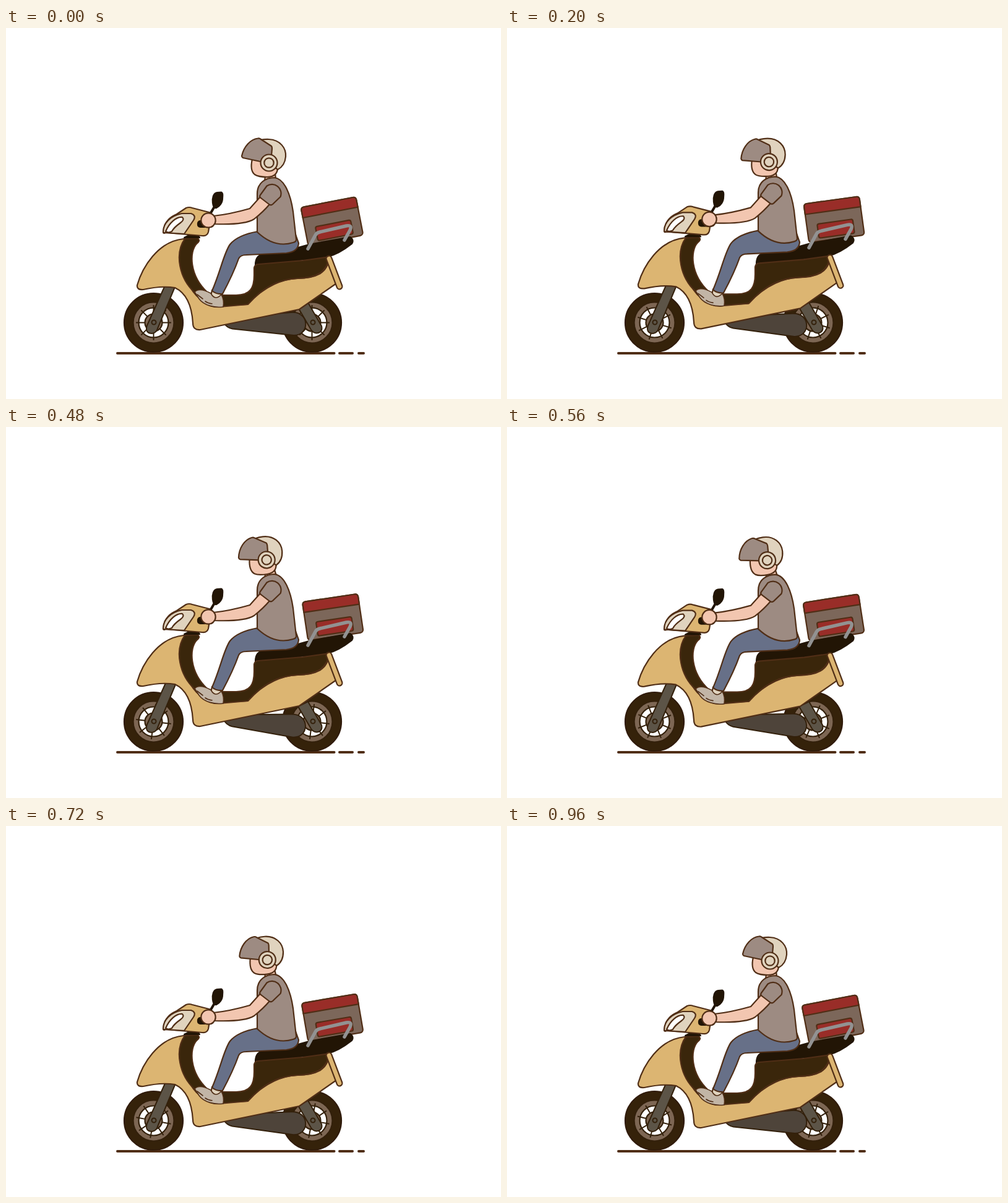
An HTML page that plays this animation: 800 px wide and 600 px high, repeating every 1000 ms.

```html
<!DOCTYPE html>
<html lang="en">
<head>
<meta charset="utf-8">
<title>Scooter courier</title>
<style>
  html, body { margin: 0; width: 100%; height: 100%; overflow: hidden; background: #fff; }
  svg { display: block; width: 100%; height: 100%; }
  .line { fill: none; stroke-linecap: round; stroke-linejoin: round; }
  .tan { fill: #dcb572; }
  .dark { fill: #3a260b; }
  .black { fill: #221505; }
  .cream { fill: #e0d3be; }
  .grey { fill: #9d8b82; }
  .skin { fill: #f2c6b0; }
  .jeans { fill: #677088; }
  .metal { fill: #5c5447; }
  .red { fill: #992d28; }
</style>
</head>
<body>
<svg viewBox="0 0 800 600" stroke="#502e16" stroke-width="2.200" stroke-linejoin="round">
  <defs>
    <g id="rim" stroke="#33200b">
      <circle r="47.500" fill="#35220a" stroke="#301b0b"/>
      <circle r="33" fill="#7d6653"/>
      <circle r="24" fill="#fff"/>
      <circle r="14" fill="#7d6653"/>
    </g>
  </defs>

  <path class="line" stroke-width="4" d="M180 526H530.500M539 526H560M570 526H578"/>

  <g transform="translate(238.500 476.500)"><use href="#rim"/><path class="spokes" stroke="#33200b" stroke-width="2"/></g>
  <g transform="translate(494.500 476.500)"><use href="#rim"/><path class="spokes" stroke="#33200b" stroke-width="2"/></g>

  <g class="metal" stroke="#33200b" stroke-width="2">
    <path d="M258 414L228 481C225 490 229 494 236 494Q243 493 245 486L275 414Z"/>
    <circle cx="239" cy="476" r="3.500"/>
    <path d="M472 452L493 488Q498 495 505 493Q512 490 510 482L488 444Z"/>
    <circle cx="496" cy="476" r="3.500"/>
  </g>

  <g id="ride">
    <path id="exhaust" fill="#4e443a" stroke="#33200b" stroke-width="2" d="M352 477L360 468L460 460C491 457 492 497 465 497L366 486.500Q357 485 352 477Z"/>

    <g id="box">
      <g transform="translate(476.500 290.300) rotate(-11)">
        <rect width="90.500" height="63" rx="5" fill="#7c675a"/>
        <path class="red" d="M0 17V5Q0 0 5 0H85.500Q90.500 0 90.500 5V17Z"/>
        <rect class="red" x="17" y="35" width="58" height="23" rx="3"/>
      </g>
    </g>

    <path class="black" stroke="#221505" d="M403 383C403 371 409 366 418 366L472 355L490 350L556 338Q563 343 559 349C545 360 533 367 520 370Z"/>
    <path class="tan" d="M212 416C220 388 245 345 287 341L300 341C280 370 285 440 340 450L390 447C420 415 450 406 470 405C500 405 520 397 522 372L534 413L474 455L314 488Q302 489 302 477C300 445 290 428 273 420C255 417 240 419 222 423Q211 424 212 416Z"/>
    <path class="dark" d="M289 341L310 340Q315 344 308 349C296 362 296 400 326 428Q332 432 345 432H372C395 432 401 420 401 400V388Q402 382 408 382L480 376L523 370C518 397 500 404 472 405C440 406 415 420 391 447L345 451C326 451 319 444 305 428C280 405 272 365 289 341Z"/>
    <path class="line" stroke-width="11" d="M522 373L539 418"/>
    <path class="line" stroke="#dcb572" stroke-width="6.600" d="M522 373L539 418"/>
    <path class="line" stroke="#929292" stroke-width="5.500" d="M488 357L500 335Q502 331 507 330L550 320Q560 318 556 327L547 343"/>

    <path class="black" stroke="#221505" d="M288 339L296 335L311 336L313 339Z"/>
    <path class="tan" d="M254 330Q256 309 276 301L291 291Q296 289 301 291L332 299L327 330Q325 337 317 336L258 331Q254 333 254 330Z"/>
    <path class="cream" d="M254 330C254 315 266 304 284 300L299 300Q308 303 303 311L288 333L257 331Q254 331 254 330Z"/>
    <path fill="#fff" d="M258 329C264 315 275 305 285 306Q289 310 282 315C275 320 270 325 268 329Q262 332 258 329Z"/>
    <path class="line" stroke="#221505" stroke-width="4" d="M331 299L338 287"/>
    <path class="black" stroke="#221505" d="M334 283C333 275 335 267 341 266L348 265.500Q351 266 350 275C350 283 345 289 340 291Q335 292 334 283Z"/>

    <path class="cream" d="M333 424L331 433Q337 442 346 437L349 429Z"/>
    <path fill="#c2b5a6" stroke-width="1.600" d="M305 427Q312 419 331 429Q338 442 348 431Q353 440 351 451C338 453 320 449 312 438Z"/>
    <path class="line" stroke-width="1.600" d="M309 431L318 438M322 442Q326 445 333 446"/>
    <path class="jeans" d="M407 329C385 333 370 340 362 350C352 364 347 393 333 425Q340 431 350 430C358 415 370 390 376 373Q379 367 388 367L453 364Q472 362 473 348L468 334Z"/>

    <g id="head">
      <path class="skin" d="M419 236H435L437 250H418Z"/>
      <path class="skin" d="M398 212C395 225 397 233 402 237Q408 241 422 241C435 241 440 234 439 222L424 205Z"/>
      <path class="cream" d="M404 184Q412 179.500 425 180C443 181 453 194 452 208C451 219 447 225 439 229L424 216Z"/>
      <path class="grey" id="visor" d="M381 207C384 192 395 180 407 178.500Q410 178 412 180L429 191Q430 192 430 195L429 206L416 217L383 210Q381 209 381 207Z"/>
      <circle class="cream" cx="425" cy="218" r="13.500"/>
      <circle class="cream" cx="425" cy="218" r="7.700"/>
    </g>

    <path class="grey" d="M406 330V268C406 250 420 242 434 242C450 244 460 269 464 297L469 342Q469 346 464 347C445 353 425 348 406 330Z"/>
    <rect class="black" stroke="#221505" x="310" y="312" width="25" height="10" rx="4"/>
    <path class="skin" d="M411 273L394 292C380 296 355 302 335 304L337 317C365 318 390 316 401 309Q415 298 427 284Z"/>
    <path class="grey" d="M411 270L421.500 255.500A14.700 14.700 0 0 1 443.500 273L431 285Q428 287.500 425 285L412 275Q409 273 411 270Z"/>
    <circle class="skin" cx="327" cy="311" r="11.700"/>
  </g>
</svg>
<script>
  const LOOP = 1000, STEP = 40, END = 960;
  const get = id => document.getElementById(id);
  const parts = ["ride", "exhaust", "box", "head", "visor"];
  const [ride, exhaust, box, head, visor] = parts.map(get);
  const spokes = document.querySelectorAll(".spokes");

  let spokePath = "";
  for (let i = 0; i < 8; i++) {
    const a = i * Math.PI / 4, x = Math.cos(a), y = Math.sin(a);
    spokePath += `M${x * 14} ${y * 14}L${x * 28.5} ${y * 28.5}`;
  }
  spokes.forEach(s => s.setAttribute("d", spokePath));

  // Rises linearly from 0 to 1 at the peak, then falls back to 0 at the end.
  const swing = (t, peak, end = END) =>
    Math.max(0, t < peak ? t / peak : (end - t) / (end - peak));

  const turn = (el, angle, x = 0, y = 0) =>
    el.setAttribute("transform", `rotate(${angle} ${x} ${y})`);

  function draw(t) {
    const lift = swing(t, 480);
    ride.setAttribute("transform", `translate(0 ${-4 * lift})`);
    turn(exhaust, 4 * lift, 340, 478);
    turn(box, 3.8 * swing(t, 240), 550, 343);
    turn(head, -10.8 * swing(t, 560), 428, 242);
    turn(visor, -4 * swing(t, 220, 520), 425, 218);
    spokes.forEach(s => turn(s, -360 * t / LOOP));
  }

  const start = performance.now();
  function tick() {
    const t = (performance.now() - start) % LOOP;
    draw(Math.floor(t / STEP) * STEP);
    requestAnimationFrame(tick);
  }
  draw(0);
  requestAnimationFrame(tick);
</script>
</body>
</html>
```
